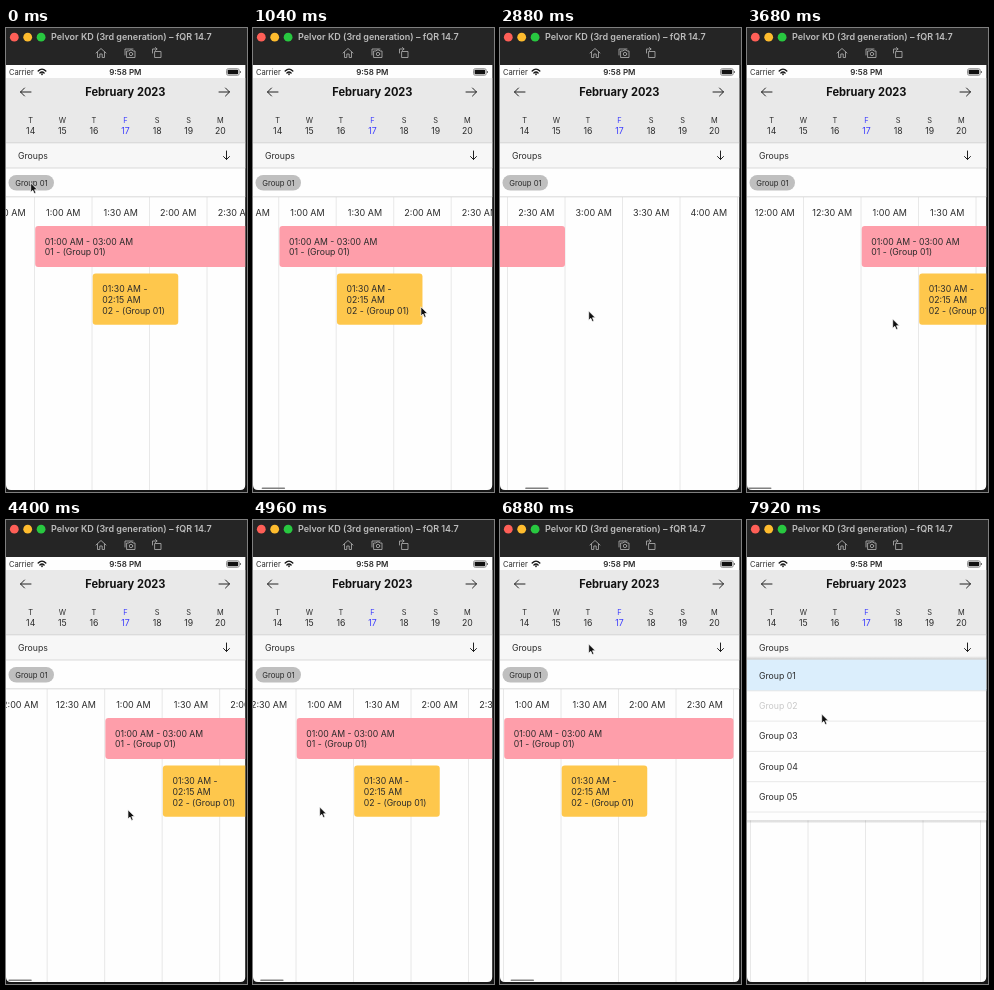
Animation of 241x464 px, one loop 8000 ms. Source, as an HTML page:

```html
<!DOCTYPE html>
<html lang="en">
<head>
<meta charset="utf-8">
<title>Schedule</title>
<style>
html, body { margin: 0; width: 100%; height: 100%; overflow: hidden; background: #111; }
svg { display: block; width: 241px; height: 464px; }
text { font: 8.7px Inter, "Liberation Sans", sans-serif; fill: #2b2b2b; white-space: pre; }
.mid { text-anchor: middle; }
.icon { fill: none; stroke: #222; stroke-width: 1; stroke-linecap: round; stroke-linejoin: round; }
</style>
</head>
<body>
<svg id="stage" viewBox="0 0 241 464">
  <defs>
    <clipPath id="screen"><path d="M0 37H239.2V457Q239.2 462 234.2 462H5Q0 462 0 457Z"/></clipPath>
    <linearGradient id="shade" x2="0" y2="1">
      <stop stop-color="#000" stop-opacity=".2"/><stop offset="1" stop-color="#000" stop-opacity="0"/>
    </linearGradient>
    <linearGradient id="rise" href="#shade" x2="0" y1="1" y2="0"/>
  </defs>

  <rect width="241" height="464" fill="#161616"/>
  <rect width="241" height="37" fill="#252525"/>
  <circle cx="8.3" cy="9.2" r="4.4" fill="#fe5f57"/>
  <circle cx="21.7" cy="9.2" r="4.4" fill="#febc2e"/>
  <circle cx="35.1" cy="9.2" r="4.4" fill="#28c840"/>
  <text x="45" y="12.2" style="font-size:9px;font-weight:600;fill:#bdbdbd">Pelvor KD (3rd generation) – fQR 14.7</text>
  <g class="icon" style="stroke:#a5a5a5;stroke-width:.9">
    <path d="M90 25L95 20.5L100 25M91.5 24V29.5H93.8V26H96.2V29.5H98.5V24"/>
    <path d="M119 27V21H127M121 23H123L124 22H126L127 23H129V29.5H121Z"/><circle cx="125" cy="26" r="1.7"/>
    <path d="M149 23.5H155V29.5H149ZM146.5 25V21H151M149.5 19.5L151 21L149.5 22.5"/>
  </g>

  <g clip-path="url(#screen)">
    <rect y="37" width="241" height="427" fill="#fefefe"/>
    <g id="track"></g>
    <rect id="bar" y="459.5" width="23.5" height="1.6" rx=".8" fill="#808080"/>

    <rect y="37" width="241" height="132" fill="#fefefe"/>
    <text x="3" y="46.8" style="font-size:7.6px">Carrier</text>
    <g class="icon" style="stroke:#111;stroke-width:1.4">
      <path d="M32.2 43Q36 39.2 39.8 43M33.9 45Q36 43 38.1 45"/><circle cx="36" cy="46.3" r=".3"/>
    </g>
    <text x="119.3" y="47" class="mid" style="font-size:8px;font-weight:600">9:58 PM</text>
    <rect x="220.5" y="40.7" width="12.8" height="6.6" rx="1.8" fill="none" stroke="#777" stroke-width=".8"/>
    <rect x="221.6" y="41.8" width="10.6" height="4.4" rx=".8" fill="#111"/>
    <path d="M234.5 43V45" stroke="#777"/>

    <rect y="50" width="241" height="65" fill="#e9e9e9"/>
    <text x="119.4" y="68" class="mid" style="font-size:11.1px;font-weight:700;fill:#111">February 2023</text>
    <path class="icon" d="M25 64H14.5M18.5 60L14.5 64L18.5 68M213 64H223.5M219.5 60L223.5 64L219.5 68"/>
    <g id="days"></g>
    <rect y="115" width="241" height="25" fill="#f7f7f7"/>
    <path d="M0 114.8H241M0 140H241M0 168.8H241" stroke="#d0d0d0" stroke-width=".8"/>
    <text x="12" y="130.6">Groups</text>
    <path class="icon" d="M220.5 123V131.5M217.5 128.5L220.5 131.5L223.5 128.5"/>
    <rect x="2.5" y="147" width="45.5" height="15.5" rx="7.75" fill="#bfbfbf"/>
    <text x="25.4" y="157.6" class="mid" style="font-size:7.7px">Group 01</text>

    <g id="menu">
      <rect y="136" width="241" height="4" fill="url(#rise)"/>
      <rect y="300" width="241" height="3.5" fill="url(#shade)"/>
      <rect y="139.7" width="241" height="160.6" fill="#fefefe"/>
      <rect y="139.7" width="241" height="31" fill="#dbeefc"/>
    </g>
  </g>
  <path id="cursor" d="M0 0V9.2L2.1 7.3L3.6 10.6L5.2 9.9L3.8 6.7H6.7Z" fill="#111" stroke="#fff" stroke-width=".7"/>
</svg>
<script>
const $ = id => document.getElementById(id);
const COL = 57.5;

function add(parent, tag, attrs, content = "") {
  const el = document.createElementNS("http://www.w3.org/2000/svg", tag);
  for (const k in attrs) el.setAttribute(k, attrs[k]);
  el.textContent = content;
  parent.append(el);
  return el;
}

[..."TWTFSSM"].forEach((letter, i) => {
  const x = 24.7 + i * 31.6, style = i === 3 ? "fill:#3a3aff" : "";
  add($("days"), "text", { x, y: 95.2, class: "mid", style: "font-size:7.4px;" + style }, letter);
  add($("days"), "text", { x, y: 105.8, class: "mid", style }, 14 + i);
});

// Half-hour columns, measured from 12:00 AM
for (let k = 0; k < 14; k++) {
  const x = k * COL;
  add($("track"), "path", { d: `M${x} 169V462`, stroke: "#e2e2e2", "stroke-width": .8 });
  const label = `${Math.floor(k / 2) || 12}:${k % 2 ? "30" : "00"} AM`;
  add($("track"), "text", { x: x + COL / 2, y: 187.6, class: "mid", style: "font-size:9px" }, label);
}

function event(start, span, y, height, fill, lines) {
  const x = start * COL;
  add($("track"), "rect", { x: x + .7, y, width: span * COL - .7, height, rx: 3, fill });
  lines.forEach((line, i) => add($("track"), "text", { x: x + 10.3, y: y + 18.5 + i * 10.8 }, line));
}
event(2, 4, 198, 41, "#fe9eaa", ["01:00 AM - 03:00 AM", "01 - (Group 01)"]);
event(3, 1.5, 245.4, 51.4, "#fec74c", ["01:30 AM -", "02:15 AM", "02 - (Group 01)"]);

const rows = [1, 2, 3, 4, 5].map(n => {
  const y = 140.5 + n * 30.3;
  add($("menu"), "path", { d: `M0 ${y}H241`, stroke: "#e3e3e3", "stroke-width": .8 });
  return add($("menu"), "text", { x: 12, y: y - 12 }, `Group 0${n}`);
});

const smooth = u => u * u * (3 - 2 * u);
const out = u => 1 - (1 - u) ** 3;

// Each key: time, values..., optional easing into it
const path = [
  [0, [24, 155]], [160, [24, 155]], [840, [170, 279]], [960, [170, 279]],
  [1840, [50, 270]], [2160, [50, 271]], [2640, [88, 283]], [2880, [88, 283]],
  [3360, [145, 291]], [4080, [145, 291]], [4960, [66, 287]], [6000, [66, 287]],
  [6800, [88, 124]], [7280, [88, 124]], [7760, [74, 194]], [8000, [74, 194]]
];
const scroll = [
  [0, [85.5]], [960, [85.5]], [1840, [205]], [2640, [279], out], [2880, [279]],
  [3600, [0]], [4160, [0]], [4960, [71]], [5760, [110.5], out], [8000, [110.5]]
];

function at(keys, t) {
  const i = keys.findIndex(k => k[0] > t);
  const [t0, a] = keys[i - 1], [t1, b, ease = smooth] = keys[i];
  const u = ease((t - t0) / (t1 - t0));
  return a.map((v, j) => v + (b[j] - v) * u);
}

function draw(now) {
  const t = Math.floor(now % 8000 / 80) * 80;
  const [s] = at(scroll, t), [x, y] = at(path, t);
  const open = t >= 7360;
  $("track").setAttribute("transform", `translate(${-1 - s})`);
  $("bar").setAttribute("x", 1 + s * .0865);
  $("bar").style.display = t > 960 && !open ? "" : "none";
  $("menu").style.display = open ? "" : "none";
  rows[1].style.opacity = t >= 7840 ? .25 : 1;
  $("cursor").setAttribute("transform", `translate(${x + .7} ${y})`);
}

const began = performance.now();
function tick() {
  draw(performance.now() - began);
  requestAnimationFrame(tick);
}
tick();
</script>
</body>
</html>
```
